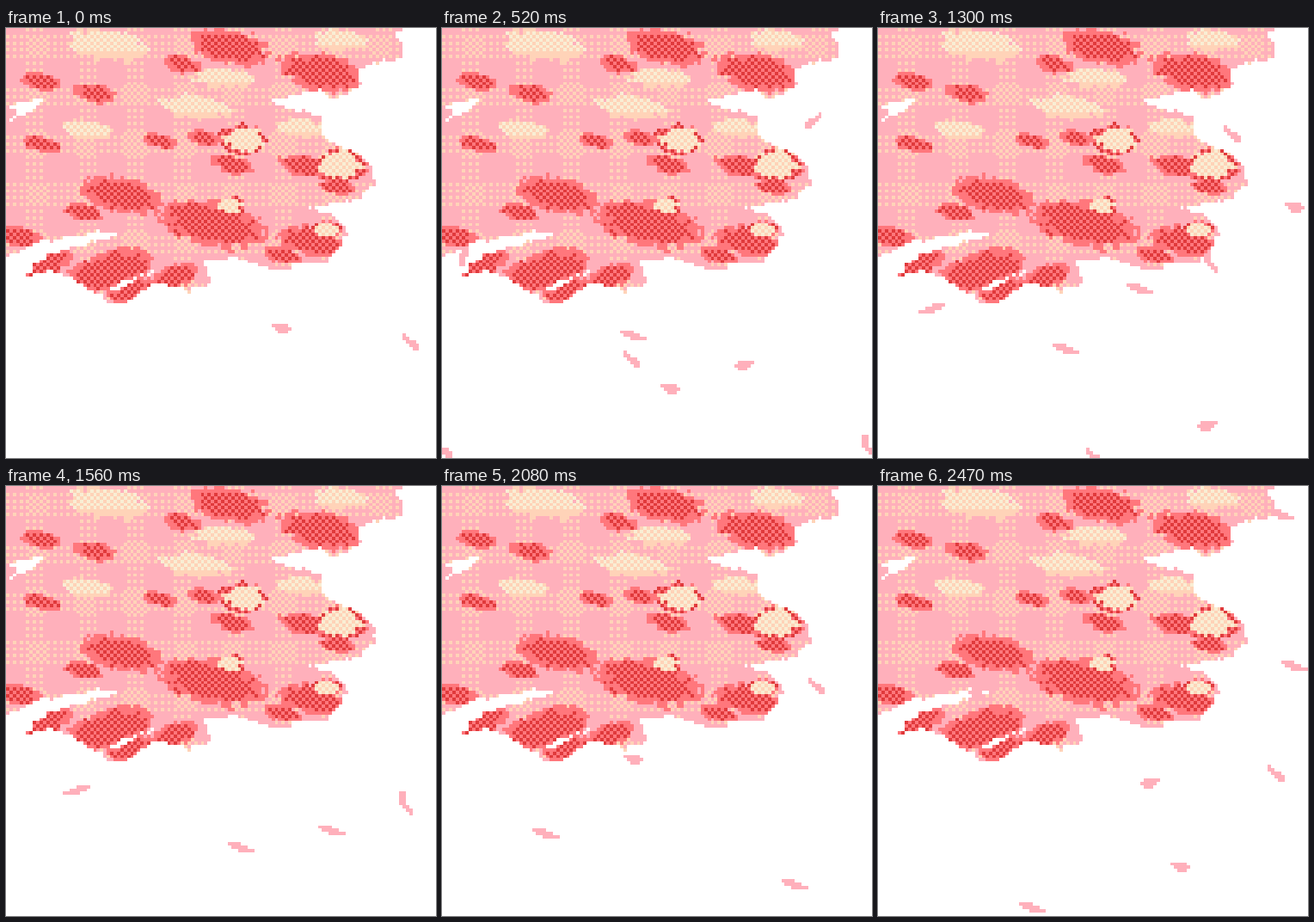
An HTML page with a canvas for the animation above (2600 ms loop, 500x500 px).

```html
<!DOCTYPE html>
<html lang="en">
<head>
<meta charset="utf-8">
<title>Falling petals</title>
<style>
html, body { margin: 0; width: 100%; height: 100%; overflow: hidden; background: #fff; }
canvas { display: block; width: 100vw; height: 100vh; image-rendering: pixelated; }
</style>
</head>
<body>
<canvas id="stage" width="128" height="128"></canvas>
<script>
const GRID = 128, CELL = 500 / GRID, STEP = 130, STEPS = 20;
const PINK = '#ffb0bb', ROSE = '#ff777c', RED = '#e03a3c', PEACH = '#ffd3b8', CREAM = '#f9eed4';

// Silhouette of the blossom, in stage pixels
const crown = `M0 0 H462 L453 9 462 18 460 37 438 38 412 48 V70 L378 82 365 72 325 80 308 84
  326 94 347 96 366 104 369 130 405 143 425 160 430 180 412 197 352 210 380 216 397 238
  376 271 360 275 340 272 322 282 290 276 264 264 255 271 228 270`;
const lowerEdge = `L238 291 230 301 H214 L218 311 200 300 172 296 140 320 H118 L112 310 92 301
  76 290 50 283 18 292 48 263 138 239 110 237 45 248 0 264 Z`;
const gaps = `M120 306 L130 296 175 283 150 294 Z M0 90 L45 80 28 98 0 110 14 97 Z`;

// Clumps of blossom: x, y, radius
const shadows = [
  [260, 22, 40], [205, 42, 20], [370, 52, 44], [40, 62, 20], [104, 76, 21], [42, 135, 18],
  [180, 132, 17], [230, 128, 18], [264, 159, 22], [345, 160, 24], [385, 185, 19], [135, 194, 42],
  [240, 228, 54], [357, 248, 34], [15, 243, 24], [90, 214, 20], [320, 264, 20],
  [120, 282, 46], [46, 274, 28], [146, 305, 26], [195, 290, 26]
];
const lights = [[118, 20, 48], [222, 93, 38], [252, 58, 34], [95, 119, 28], [345, 116, 28], [390, 14, 32]];
const flowers = [[276, 130, 27], [390, 159, 30], [262, 208, 17], [373, 235, 16]];

function hash(x, y) {
  const n = Math.sin(x * 127.1 + y * 311.7) * 43758.5453;
  return n - Math.floor(n);
}

// Distance from a clump's centre, 1 at its ragged rim
function reach(px, py, [x, y, r], squash, tilt, rough) {
  const dx = px - x, dy = py - y, c = Math.cos(tilt), s = Math.sin(tilt);
  return Math.hypot(dx * c + dy * s, (dy * c - dx * s) / squash) / r + (rough - .5) * .5;
}

// Dither that fades in and out every 57 pixels, both ways
function plaid(x, y) {
  const band = p => Math.cos((p - 36) / 57.2 * 2 * Math.PI) > .19;
  const across = band((x + .5) * CELL), down = band((y + .5) * CELL + 15);
  const dot = across && down ? (x + y) % 2 === 0 : (across || down) && x % 2 === 0 && y % 2 === 0;
  return dot ? PEACH : PINK;
}

function colourAt(x, y) {
  const px = (x + .5) * CELL, py = (y + .5) * CELL;
  const even = (x + y) % 2 === 0;
  const rough = (hash(x, y) + hash(x >> 1, y >> 1)) / 2;
  let colour = plaid(x, y);
  for (const clump of lights) {
    if (reach(px, py, clump, .36, .1, rough) < 1) colour = even && py < clump[1] + 6 ? CREAM : PEACH;
  }
  for (const clump of shadows) {
    const d = reach(px, py, clump, .42, clump[1] > 268 ? -.3 : .2, rough);
    if (d < .9) colour = even ? RED : ROSE;
    else if (d < 1.15) colour = ROSE;
  }
  for (const clump of flowers) {
    const d = reach(px, py, clump, .65, .1, rough);
    if (d < .8) colour = even ? CREAM : PEACH;
    else if (d < 1.1 && rough > .4) colour = even ? RED : ROSE;
  }
  return colour;
}

function drawTree() {
  const tree = document.createElement('canvas');
  tree.width = tree.height = GRID;
  const g = tree.getContext('2d');
  const shape = new Path2D(crown + lowerEdge + gaps);
  for (let y = 0; y < GRID; y++) {
    for (let x = 0; x < GRID; x++) {
      const jitter = (hash(y, x) - .5) * 3;
      if (!g.isPointInPath(shape, (x + .5) * CELL + jitter, (y + .5) * CELL + jitter, 'evenodd')) continue;
      g.fillStyle = colourAt(x, y);
      g.fillRect(x, y, 1, 1);
    }
  }
  return tree;
}

// Petal poses: start and length of each row
const poses = {
  flat: [[0, 5], [1, 5], [2, 3]],
  long: [[0, 4], [1, 5], [3, 5]],
  diag: [[0, 1], [0, 2], [1, 3], [2, 3], [3, 2]],
  steep: [[0, 2], [0, 2], [0, 2], [0, 2], [1, 2], [2, 2], [3, 1]],
  tall: [[0, 1], [0, 2], [0, 2], [0, 3], [1, 2], [1, 2], [1, 2]]
};

const ctx = document.getElementById('stage').getContext('2d');
const tree = drawTree();
const petals = [];

// A minus before the pose mirrors it
function drawPetal(x, y, name) {
  const mirror = name[0] === '-';
  const rows = poses[mirror ? name.slice(1) : name];
  const width = Math.max(...rows.map(([start, len]) => start + len));
  const left = Math.round(x / CELL - width / 2), top = Math.round(y / CELL - rows.length / 2);
  rows.forEach(([start, len], i) =>
    ctx.fillRect(left + (mirror ? width - start - len : start), top + i, len, 1));
}

// Straight flight that passes x, y at the given step
function blow(vx, vy, before, after) {
  return (at, x, y, pose) => petals.push(step => {
    const s = step - at;
    if (s >= -before && s <= after) drawPetal(x + vx * s, y + vy * s, pose);
  });
}

// Slow fall through a few points: step, x, y, pose
function drift(...keys) {
  petals.push(step => {
    const last = keys.length - 1;
    if (step < keys[0][0] - 1 || step > keys[last][0] + 1) return;
    let i = 0;
    while (i < last - 1 && step >= keys[i + 1][0]) i++;
    const [t0, x0, y0, pose] = keys[i], [t1, x1, y1, next] = keys[i + 1];
    const p = (step - t0) / (t1 - t0);
    drawPetal(x0 + (x1 - x0) * p, y0 + (y1 - y0) * p, p < 1 ? pose : next);
  });
}

const gust = blow(38, 49, 3, 3), breeze = blow(50, 25, 2, 1);

gust(4, 222, 357, 'long');
gust(4, 265, 419, 'flat');
gust(4, 3, 491, 'diag');
gust(10, 304, 302, 'long');
gust(10, 387, 271, 'steep');
blow(43, 42, 3, 3)(16, 224, 317, 'flat');
breeze(4, 432, 108, '-diag');
breeze(10, 485, 208, 'flat');
breeze(19, 484, 209, 'long');
breeze(19, 470, 33, 'long');
breeze(19, 121, 243, 'long');

drift([4, 25, 264, '-tall'], [7, 33, 296, 'long'], [10, 62, 326, '-long'],
      [16, 121, 404, 'long'], [19, 179, 490, 'long']);
drift([7, 222, 334, 'long'], [10, 218, 373, 'long'], [12, 273, 420, 'long'], [16, 410, 463, 'long']);
drift([7, 411, 82, '-diag'], [10, 411, 124, 'diag'], [16, 435, 233, 'diag'],
      [20, 470, 366, 'diag'], [24, 498, 487, 'steep']);
drift([18, 300, 260, 'flat'], [19, 317, 344, '-flat'], [20, 320, 349, 'flat'],
      [24, 352, 392, '-flat'], [27, 395, 423, 'flat'], [30, 383, 462, '-flat']);
drift([24, 220, 385, 'diag'], [27, 239, 451, '-tall'], [30, 250, 497, 'diag']);

function frame() {
  const step = Math.floor(performance.now() / STEP) % STEPS;
  ctx.fillStyle = '#fff';
  ctx.fillRect(0, 0, GRID, GRID);
  ctx.fillStyle = PINK;
  for (const petal of petals) {
    petal(step);
    petal(step + STEPS);
  }
  ctx.drawImage(tree, 0, 0);
  requestAnimationFrame(frame);
}
frame();
</script>
</body>
</html>
```
